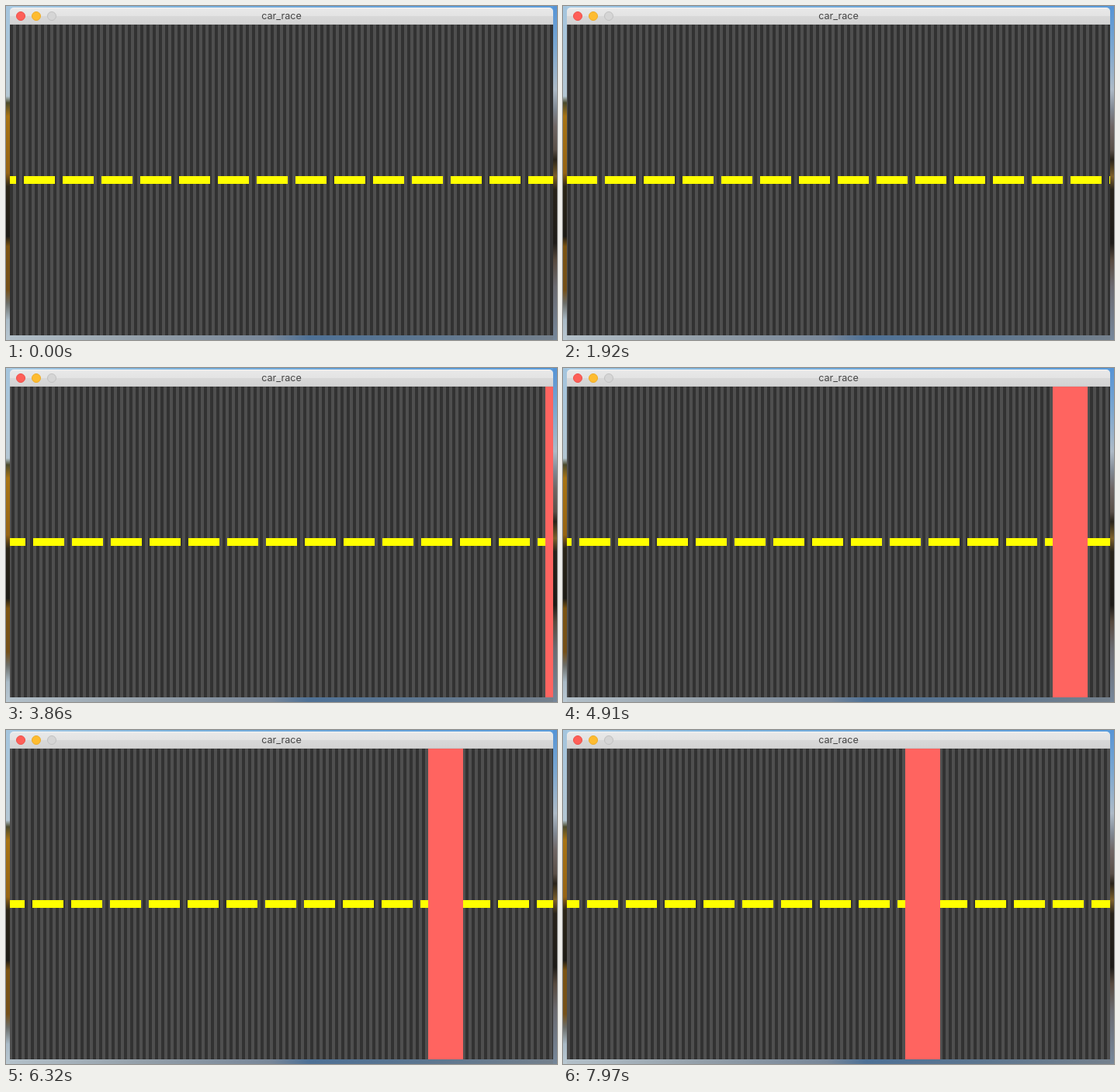
Write an HTML page with a canvas that moves like this. It is 710x430 px and loops after 8000 ms.

```html
<!DOCTYPE html>
<html lang="en">
<head>
<meta charset="utf-8">
<title>car_race</title>
<style>
  html, body { margin: 0; width: 100%; height: 100%; overflow: hidden; }
  body { position: relative; background: #7d8790; }
  body > * { position: absolute; }
  .desk { left: 0; top: 0; width: 710px; height: 430px; }
  .bar {
    left: 5px; top: 2px; width: 700px; height: 22px;
    box-sizing: border-box;
    border-radius: 5px 5px 0 0;
    border-top: 1px solid #f4f4f4;
    border-bottom: 1px solid #c4c4c4;
    background: linear-gradient(#e9e9e9, #e3e3e3 48%, #d8d8d8 52%, #d3d3d3);
    font: 12.6px/20px Inter, sans-serif;
    color: #444;
    text-align: center;
  }
  .bar i {
    position: absolute; top: 4px; width: 12px; height: 12px;
    box-sizing: border-box; border-radius: 50%;
    border: 1px solid;
  }
  .close { left: 8px; background: #fe5f58; border-color: #ee5049 !important; }
  .mini { left: 28px; background: #febc30; border-color: #eeac28 !important; }
  .zoom { left: 48px; background: #d5d5d5; border-color: #c1c1c1 !important; }
  canvas { left: 5px; top: 24px; }
</style>
</head>
<body>
<svg class="desk" viewBox="0 0 710 430">
  <defs>
    <linearGradient id="top">
      <stop offset="0" stop-color="#a9cbe4"/>
      <stop offset=".3" stop-color="#7db3dd"/>
      <stop offset=".6" stop-color="#6aa5da"/>
      <stop offset="1" stop-color="#5b9cdb"/>
    </linearGradient>
    <linearGradient id="left" x2="0" y2="1">
      <stop offset="0" stop-color="#a4c5de"/>
      <stop offset=".27" stop-color="#b3c6d2"/>
      <stop offset=".29" stop-color="#4b4a2c"/>
      <stop offset=".33" stop-color="#a87414"/>
      <stop offset=".5" stop-color="#966414"/>
      <stop offset=".54" stop-color="#2c2618"/>
      <stop offset=".69" stop-color="#1e1c16"/>
      <stop offset=".72" stop-color="#7c5411"/>
      <stop offset=".85" stop-color="#74501a"/>
      <stop offset=".89" stop-color="#6b6d68"/>
      <stop offset=".94" stop-color="#a9bac6"/>
      <stop offset="1" stop-color="#b9c8d2"/>
    </linearGradient>
    <linearGradient id="right" x2="0" y2="1">
      <stop offset="0" stop-color="#5594d6"/>
      <stop offset=".12" stop-color="#79a6d0"/>
      <stop offset=".25" stop-color="#adbac6"/>
      <stop offset=".31" stop-color="#7f8791"/>
      <stop offset=".36" stop-color="#6f6664"/>
      <stop offset=".43" stop-color="#5a5048"/>
      <stop offset=".46" stop-color="#2a241a"/>
      <stop offset=".51" stop-color="#7c602a"/>
      <stop offset=".55" stop-color="#28231a"/>
      <stop offset=".71" stop-color="#1e1c18"/>
      <stop offset=".76" stop-color="#574a3e"/>
      <stop offset=".84" stop-color="#6a6a70"/>
      <stop offset="1" stop-color="#76879a"/>
    </linearGradient>
    <linearGradient id="foot">
      <stop offset="0" stop-color="#b4c1ca"/>
      <stop offset=".25" stop-color="#939fa9"/>
      <stop offset=".48" stop-color="#788799"/>
      <stop offset=".55" stop-color="#4e7196"/>
      <stop offset=".75" stop-color="#5c7690"/>
      <stop offset="1" stop-color="#75818d"/>
    </linearGradient>
  </defs>
  <rect width="710" height="8" fill="url(#top)"/>
  <rect y="424" width="710" height="6" fill="url(#foot)"/>
  <rect width="5" height="430" fill="url(#left)"/>
  <rect x="705" width="5" height="430" fill="url(#right)"/>
</svg>
<div class="bar"><i class="close"></i><i class="mini"></i><i class="zoom"></i>car_race</div>
<canvas width="700" height="400"></canvas>
<script>
  const W = 700, H = 400, LOOP = 8000;
  const ctx = document.querySelector('canvas').getContext('2d');

  // Ticks come about every 87 ms; each entry begins a group of ten.
  const groups = [90, 960, 1830, 2710, 3590, 4470, 5350, 6230, 7100, 7970];
  const ticks = [0];
  groups.slice(0, -1).forEach((start, g) => {
    const step = (groups[g + 1] - start) / 10;
    for (let i = 0; i < 10; i++) ticks.push(Math.round((start + i * step) / 10) * 10);
  });
  ticks.push(7970);

  // Distance scrolled, as [tick, pixels]
  const route = [[0, 0], [12, 65], [31, 168], [44, 238], [56, 302], [72, 389], [90, 486], [91, 492]];

  function distance(tick) {
    const n = Math.max(1, route.findIndex(([k]) => k >= tick));
    const [k0, d0] = route[n - 1], [k1, d1] = route[n];
    return Math.round(d0 + (d1 - d0) * (tick - k0) / (k1 - k0));
  }

  function repeat(color, first, period, width, y, height) {
    ctx.fillStyle = color;
    for (let x = first % period - period; x < W; x += period) ctx.fillRect(x, y, width, height);
  }

  function draw(d) {
    ctx.fillStyle = '#4f4f4f';
    ctx.fillRect(0, 0, W, H);
    repeat('#323232', 8 - d % 8, 8, 4, 0, H);
    repeat('#ffff00', 68 - d % 50, 50, 40, 195, 10);
    ctx.fillStyle = '#ff6460';
    ctx.fillRect(928 - d, 0, 45, H);
  }

  let shown = -1;
  function play() {
    const t = performance.now() % LOOP;
    let tick = ticks.length - 1;
    while (ticks[tick] > t) tick--;
    if (tick !== shown) draw(distance(shown = tick));
    requestAnimationFrame(play);
  }
  play();
</script>
</body>
</html>
```
